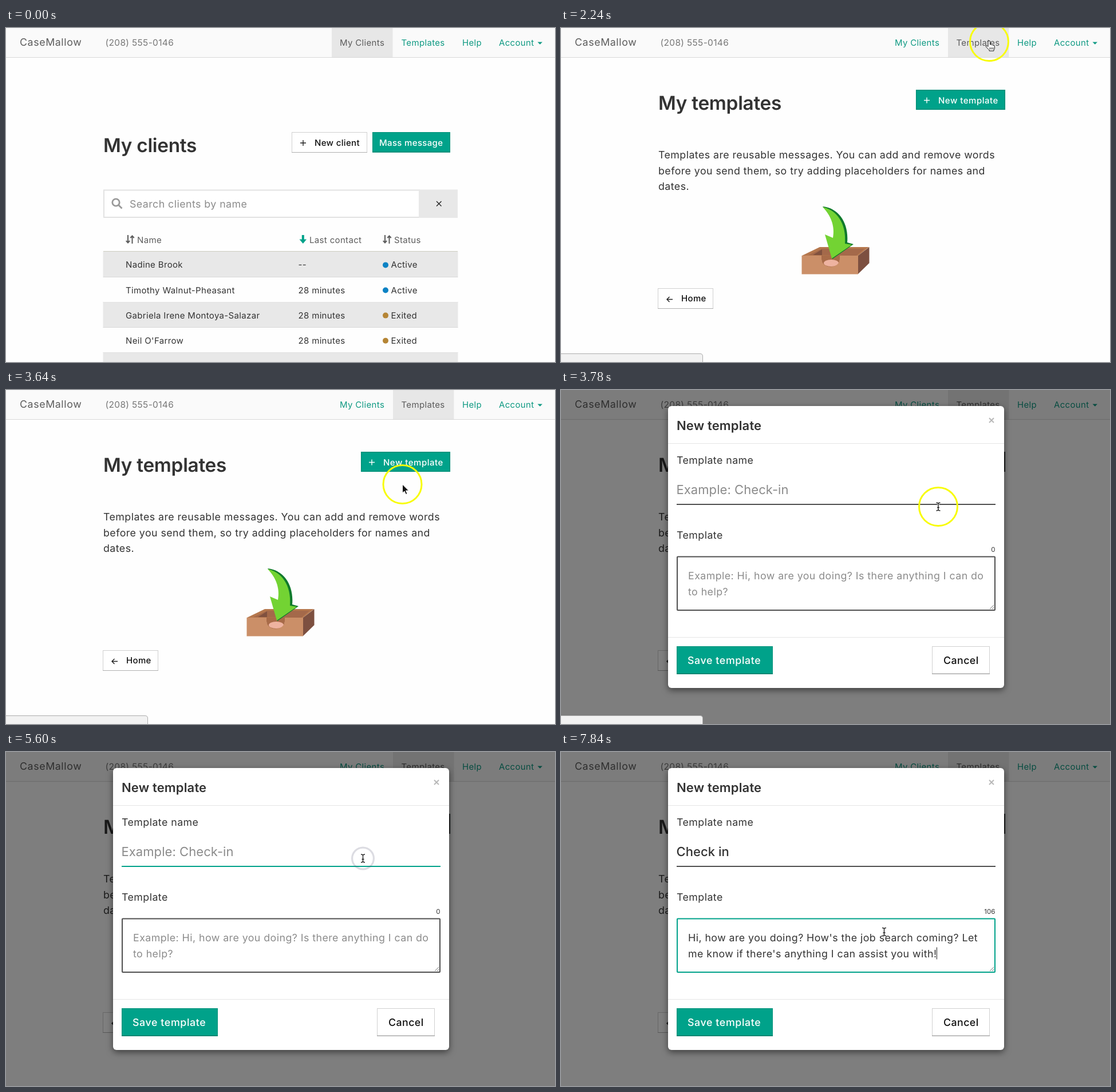
An HTML page for the animation above (8 s loop, 959 by 584 pixels).

```html
<!DOCTYPE html>
<html lang="en">
<head>
<meta charset="utf-8">
<title>Creating a message template</title>
<style>
  html, body { margin: 0; width: 100%; height: 100%; overflow: hidden; background: #fefefe; }
  svg { display: block; }
  text { font: 15px Inter, sans-serif; font-optical-sizing: none; letter-spacing: .34px; fill: #333;
         text-rendering: geometricPrecision; white-space: pre; }
  .large { font-size: 17.8px; letter-spacing: .44px; }
  .field { font-size: 22px; letter-spacing: .06px; }
  .title { font-size: 33.4px; font-weight: 600; letter-spacing: -.3px; }
  .medium { font-weight: 500; }
  .dark { fill: #111; }
  .white { fill: #fff; }
  .hint { fill: #8b8b8b; }
  .grey { fill: #5c5c5c; }
  .link { fill: #0f9a83; }
  .teal { fill: #00a28a; }
  .edge { fill: #00806d; }
  .primary { fill: #00a28a; stroke: #009079; }
  .band { fill: #e8e8e8; }
  .line { fill: #d8d8d8; }
  .box { fill: #fff; stroke: #d0d0d0; }
  .stroke { fill: none; stroke: #222; stroke-width: 1.4; }
</style>
</head>
<body>
<svg width="959" height="584" viewBox="0 0 959 584">
  <defs>
    <g id="sort" stroke="#5c5c5c" stroke-width="2" fill="none">
      <path d="M4 0V13M.8 10 4 13.6 7.2 10M11.5 15V2M8.3 5 11.5 1.4 14.7 5"/>
    </g>
    <path id="plus" fill="none" stroke-width="1.4" d="M-5 0H5M0-5V5"/>
  </defs>
  <rect width="959" height="584" fill="#fefefe"/>

  <rect width="959" height="51" fill="#fafafa"/>
  <rect y="51" width="959" height="1" class="line"/>
  <rect id="tab" width="106.5" height="51" fill="#e7e7e7"/>
  <text class="large grey" x="24" y="31.3" style="letter-spacing:.6px">CaseMallow</text>
  <text x="173.5" y="30.5" style="font-size:15.5px;fill:#777">(208) 555-0146</text>
  <text id="navClients" x="583" y="30.5">My Clients</text>
  <text id="navTemplates" x="690.5" y="30.5">Templates</text>
  <text class="link" x="797" y="30.5">Help</text>
  <text class="link" x="861" y="30.5">Account</text>
  <path class="link" d="M928.5 24.5H937L932.8 28.8Z"/>

  <g id="clients">
    <text class="title" x="170" y="217">My clients</text>
    <rect class="box" x="499.5" y="182.5" width="131" height="35"/>
    <rect x="499" y="217" width="132" height="1" fill="#b0b0b0"/>
    <use href="#plus" x="519" y="201" stroke="#222"/>
    <text class="medium dark" x="539" y="206">New client</text>
    <rect class="primary" x="640.5" y="182.5" width="135" height="34.5"/>
    <rect class="edge" x="640" y="216.5" width="136" height="1"/>
    <text class="medium white" x="652" y="206">Mass message</text>

    <rect x="171" y="283.5" width="551" height="47.5" fill="#fff" stroke="#e2e2e2" stroke-width="2"/>
    <rect class="band" x="721" y="282.5" width="68" height="49.5"/>
    <path class="stroke" d="M752 303 760.5 311.5M760.5 303 752 311.5"/>
    <g fill="none" stroke="#999" stroke-width="2.8">
      <circle cx="192" cy="305" r="6.2"/><path d="M196.5 309.5 202.5 315.5"/>
    </g>
    <text class="large hint" x="216" y="314.4">Search clients by name</text>

    <use href="#sort" x="209" y="362"/>
    <text class="grey" x="229" y="376.4">Name</text>
    <path class="teal" d="M516.8 362H520.8V369.5H525L518.8 377 512.5 369.5H516.8Z"/>
    <text class="grey" x="530" y="376.4">Last contact</text>
    <use href="#sort" x="658" y="362"/>
    <text class="grey" x="678" y="376.4">Status</text>
    <g id="rows"></g>
    <rect x="170" y="390" width="619" height="1" fill="#ccccc0"/>
  </g>

  <g id="templates">
    <text class="title" x="170" y="143">My templates</text>
    <rect id="create" x="620.75" y="108.75" width="154.5" height="33.5" stroke-width="1.6"/>
    <use href="#plus" x="639" y="126.5" stroke="#fff"/>
    <text class="medium white" x="659" y="131.5" style="letter-spacing:.5px">New template</text>
    <text class="large" x="170" y="228.4">Templates are reusable messages. You can add and remove words</text>
    <text class="large" x="170" y="255.9">before you send them, so try adding placeholders for names and</text>
    <text class="large" x="170" y="283.4">dates.</text>

    <path fill="#b5774d" d="M421 398 452 383H538L519 398Z"/>
    <path fill="#a4694a" d="M432 397 456 386H530L516 398Z"/>
    <path fill="#80513f" d="M440 397 456 387V397Z"/>
    <path fill="#7d5040" d="M519 398 538.5 383V411L519 430Z"/>
    <path fill="#a86b48" d="M455 398H487V405C487 423 455 423 455 405Z"/>
    <ellipse cx="472" cy="411" rx="13" ry="6" fill="#eeb3a0"/>
    <path fill="#cb8f68" d="M420.5 398H455V404C456 422 486 422 487 404V398H519V430.5H420.5Z"/>
    <path fill="#0f7a2c" d="M457 312C486 315 503 342 500 375L511 378 474 404 468 380 478 366C480 346 471 327 457 312Z"/>
    <path fill="#73d333" d="M457 313C481 318 499 341 496 377L508 379 473 403 461 361 475 367C479 346 471 327 457 313Z"/>

    <rect class="box" x="169.5" y="455.5" width="96" height="35"/>
    <rect x="169" y="490" width="97" height="1" fill="#b0b0b0"/>
    <path class="stroke" d="M195 474.5H185M189.5 470 185 474.5 189.5 479"/>
    <text class="medium dark" x="210" y="478.4">Home</text>
  </g>

  <g id="modal">
    <rect width="959" height="584" opacity=".5"/>
    <rect x="774" y="108" width="2" height="35" fill="#1a1a1a"/>
    <rect x="187" y="28" width="587" height="493" rx="6" fill="#fff"
      style="filter:drop-shadow(0 4px 6px rgba(0,0,0,.5))"/>
    <text x="202" y="69.5" style="font-size:22px;font-weight:600;letter-spacing:.15px">New template</text>
    <path d="M748 49 756 57M756 49 748 57" stroke="#b8b8b8" stroke-width="2"/>
    <path d="M187 93.5H774M187 432.5H774" stroke="#e5e5e5"/>
    <text class="large" x="202" y="129.4">Template name</text>
    <text class="field hint" id="nameHint" x="201.5" y="182">Example: Check-in</text>
    <text class="field medium" id="name" x="201.5" y="182"></text>
    <rect id="nameLine" x="202" y="199" width="557" height="2"/>
    <text class="large" x="202" y="259.5">Template</text>
    <text id="count" x="758.5" y="283.3" text-anchor="end" style="font-size:11.5px;letter-spacing:.1px"></text>
    <rect id="area" x="203" y="291.5" width="555" height="93.5" rx="1" fill="#fff" stroke-width="2"/>
    <path d="M749 383 756 376M753 383 756 380" stroke="#777"/>
    <g id="areaHint">
      <text class="large hint" x="222" y="331.3">Example: Hi, how are you doing? Is there anything I can do</text>
      <text class="large hint" x="222" y="358.8">to help?</text>
    </g>
    <text class="large" id="line1" x="222" y="331.3"></text>
    <text class="large" id="line2" x="222" y="358.8"></text>
    <rect id="caret" width="1" fill="#222"/>
    <rect class="primary" x="202.5" y="448.5" width="167" height="47.5"/>
    <rect class="edge" x="202" y="495.5" width="168" height="1.5"/>
    <text class="large medium white" x="221" y="479" style="letter-spacing:.6px">Save template</text>
    <rect class="box" x="648.5" y="448.5" width="100" height="48"/>
    <rect x="648" y="495.5" width="101" height="1.5" fill="#aaa"/>
    <text class="large medium dark" x="668" y="479">Cancel</text>
  </g>

  <path id="status" d="M-2 569.5H243Q247.5 569.5 247.5 574V586H-2Z" fill="#f2f2f2" stroke="#adadad"/>

  <g id="pointer">
    <circle id="halo" r="33.5" fill="none" stroke="#f8fc06" stroke-width="3"/>
    <circle id="ring" fill="none" stroke-width="3.2"/>
    <path id="arrow" fill="#111" stroke="#fff" d="M0 0V15L3.5 12 6 17.5 8.5 16.4 6 11H11Z"/>
    <g id="hand" stroke="#111" fill="#fff">
      <path d="M-2 0a1.8 1.8 0 0 1 3.6 0V5q2-1 3 .6q2-.8 2.8.8q2-.2 2 2V11q0 2-1.4 3.5V16H0V14.5L-5.5 9q-.8-2 1-2.2q1 0 2.5 1.8Z"/>
      <path d="M1.3 10V13.5M4 10V13.5M6.7 10V13.5"/>
    </g>
    <g id="beam" fill="none">
      <path id="beamShape" d="M-3.5-7Q0-7 0-5V5Q0 7-3.5 7M3.5-7Q0-7 0-5M0 5Q0 7 3.5 7M-2 1.5H2"
        style="stroke:inherit;stroke-width:inherit"/>
      <use href="#beamShape" stroke="#fff" stroke-width="3"/>
      <use href="#beamShape" stroke="#222" stroke-width="1.4"/>
    </g>
  </g>
</svg>
<script>
const LOOP = 8000, STEP = 140;
const PAGE_AT = 1960, MODAL_AT = 3780, NAME_AT = 5040, AREA_AT = 7000;
const TEAL = '#00a28a', DARK = '#505050';
const MESSAGE = ["Hi, how are you doing? How's the job search coming? Let ",
                 "me know if there's anything I can assist you with!"];
const TOTAL = MESSAGE.join('').length;

// Pointer stops: time, x, y
const PATH = [[420, 690, -8], [980, 748, 24], [2240, 748, 24], [2800, 726, 126], [3500, 726, 126],
              [3780, 659, 204], [4620, 623.5, 186], [6580, 623.5, 186], [6860, 564.5, 314.5]];
// Mouse presses: down, up
const CLICKS = [[1540, 1540], [2940, 3080], [5040, 5320], [6860, 6860]];

const $ = id => document.getElementById(id);
const show = (id, on) => $(id).style.display = on ? '' : 'none';
const set = (id, attrs) => { for (const k in attrs) $(id).setAttribute(k, attrs[k]); };
const clamp = (v, lo, hi) => Math.min(hi, Math.max(lo, v));

$('rows').innerHTML = [
  ['Nadine Brook', '--', 'Active'],
  ['Timothy Walnut-Pheasant', '28 minutes', 'Active'],
  ['Gabriela Irene Montoya-Salazar', '28 minutes', 'Exited'],
  ["Neil O'Farrow", '28 minutes', 'Exited'],
  ['', '', '']
].map(([name, contact, status], i) => {
  const y = 391 + i * 44.1;
  const dot = status === 'Active' ? '#0b82c4' : '#b58535';
  return `${i % 2 ? '' : `<rect class="band" x="169.5" y="${y}" width="620" height="44"/>`}
    <rect class="line" x="169.5" y="${Math.round(y + 44)}" width="620" height="1"/>
    <text x="209" y="${y + 28.4}">${name}</text>
    <text x="510.5" y="${y + 28.4}">${contact}</text>
    ${status && `<circle cx="663" cy="${y + 23.4}" r="5" fill="${dot}"/>`}
    <text x="672.5" y="${y + 28.4}">${status}</text>`;
}).join('');

function pointerAt(t) {
  const i = PATH.findIndex(p => p[0] > t);
  if (i < 0) return PATH[PATH.length - 1].slice(1);
  if (i === 0) return PATH[0].slice(1);
  const [t0, x0, y0] = PATH[i - 1], [t1, x1, y1] = PATH[i];
  const u = (t - t0) / (t1 - t0), e = u * u * (3 - 2 * u);
  return [x0 + (x1 - x0) * e, y0 + (y1 - y0) * e];
}

function drawPointer(t, modal) {
  const [x, y] = pointerAt(t), [nx, ny] = pointerAt(t + STEP);
  const hand = !modal && x > 690 && (y < 45 || (y > 105 && y < 146));
  const visible = t >= PATH[0][0];
  set('pointer', { transform: `translate(${x} ${y})` });
  show('pointer', visible);
  show('halo', Math.hypot(nx - x, ny - y) > .1);
  show('beam', modal);
  show('hand', hand);
  show('arrow', !modal && !hand);
  show('status', visible && hand || t >= 3500 && t < 4060);

  // A pressed ring stays tight, then widens and fades on release.
  const click = CLICKS.find(([down, up]) => t >= down && t < up + 2.5 * STEP);
  show('ring', click);
  if (click) {
    const u = Math.max(0, (t - click[1]) / STEP);
    const tint = u > 1 ? '#505070' : u > 0 ? '#4444a8' : '#2b2bd0';
    set('ring', { r: 9.5 + 4.7 * u, stroke: tint, opacity: 1 - .4 * u });
  }
}

function drawForm(t) {
  const inName = t >= NAME_AT && t < AREA_AT, inArea = t >= AREA_AT;
  const typedName = 'Check in'.slice(0, clamp(Math.round((t - 5600) / 52.5), 0, 8));
  const n = clamp(Math.round((t - AREA_AT) / 840 * TOTAL), 0, TOTAL);
  const split = MESSAGE[0].length;
  $('name').textContent = typedName;
  $('line1').textContent = MESSAGE[0].slice(0, n);
  $('line2').textContent = MESSAGE[1].slice(0, Math.max(0, n - split));
  $('count').textContent = n;
  show('nameHint', !typedName);
  show('areaHint', !n);
  set('nameLine', { fill: inName ? TEAL : DARK });
  set('area', { stroke: inArea ? TEAL : DARK });

  const blinkOff = t >= 5600 && t < 5740 || t >= 6300 && t < 6580;
  show('caret', (inName || inArea) && !blinkOff);
  const line = inName ? 'name' : n > split ? 'line2' : 'line1';
  const left = +$(line).getAttribute('x') + $(line).getComputedTextLength();
  const top = { name: 160, line1: 314, line2: 341.5 }[line];
  set('caret', { x: Math.round(left), y: top, height: inName ? 27 : 21 });
}

function draw(t) {
  const templates = t >= PAGE_AT, modal = t >= MODAL_AT;
  const pressed = t >= 2940 && t < 3360;
  show('clients', !templates);
  show('templates', templates);
  show('modal', modal);
  set('tab', { x: templates ? 676 : 569 });
  set('navClients', { class: templates ? 'link' : 'grey' });
  set('navTemplates', { class: templates ? 'grey' : 'link' });
  set('create', { fill: pressed ? '#9b0049' : TEAL, stroke: pressed ? '#3ecabf' : '#009079' });
  if (modal) drawForm(t);
  drawPointer(t, modal);
}

function tick() {
  draw(Math.floor(performance.now() % LOOP / STEP) * STEP);
  requestAnimationFrame(tick);
}
tick();
</script>
</body>
</html>
```
